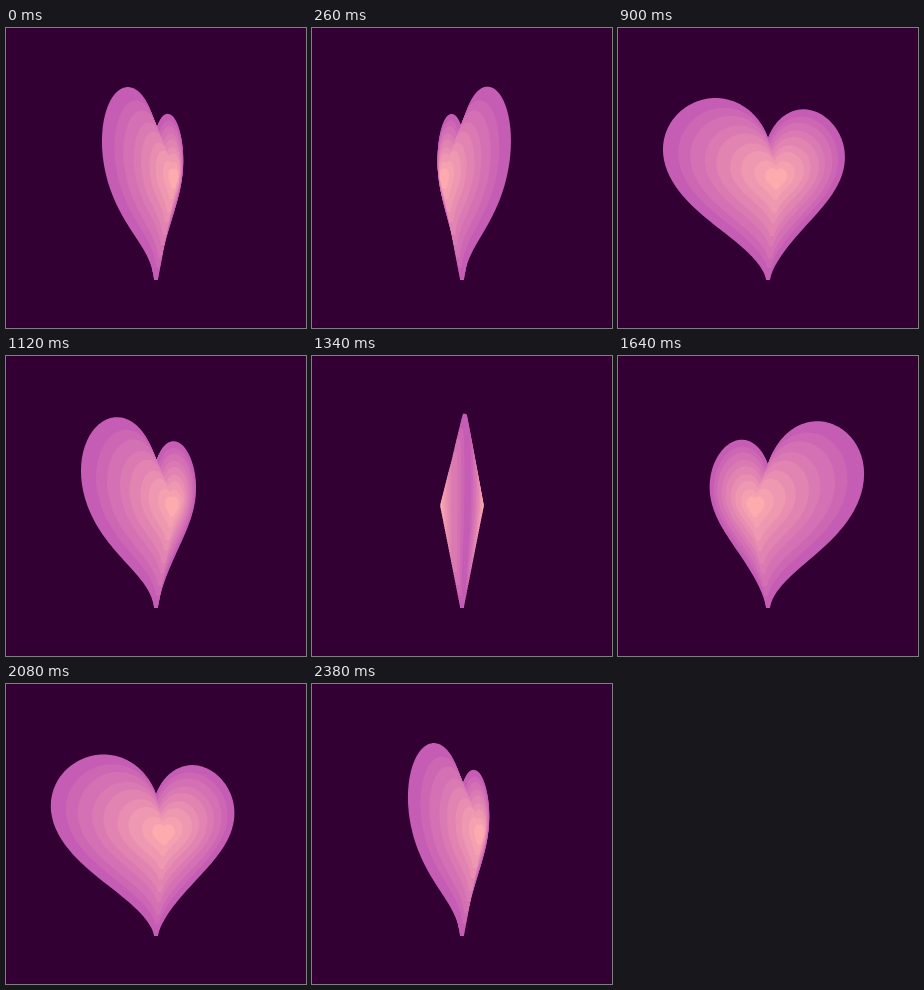
Recreate the animation shown at these times as an HTML page with a canvas. Size 300 by 300 pixels, loop 2400 ms.

```html
<!DOCTYPE html>
<html lang="en">
<head>
<meta charset="utf-8">
<title>Turning heart</title>
<style>
  html, body { margin: 0; width: 100%; height: 100%; overflow: hidden; background: #303; }
  canvas { display: block; width: 300px; height: 300px; }
</style>
</head>
<body>
<canvas id="stage" width="300" height="300"></canvas>
<script>
const ctx = document.getElementById('stage').getContext('2d');
const LOOP = 2400, STEP = 20, START = 69.2 * Math.PI / 180;
const CAMERA = 150 / Math.tan(Math.PI / 6);
const DEPTH = 20, LAYERS = 40, SHADES = 9, POINTS = 160;
const RIM = [198, 93, 181], PEAK = [252, 171, 175];

const outline = Array.from({ length: POINTS }, (_, i) => {
  const a = i / POINTS * 2 * Math.PI;
  return [
    96 * Math.sin(a) ** 3,
    -6 * (13 * Math.cos(a) - 5 * Math.cos(2 * a) - 2 * Math.cos(3 * a) - Math.cos(4 * a))
  ];
});

// Thin slices shrink towards a peak on both sides; their colours form bands.
const layers = [];
for (let i = 1 - LAYERS; i < LAYERS; i++) {
  const k = Math.abs(i) / LAYERS;
  const shade = Math.floor(k * SHADES) / (SHADES - 1);
  layers.push({
    z: i / LAYERS * DEPTH,
    scale: 1 - k,
    color: `rgb(${RIM.map((c, j) => Math.round(c + (PEAK[j] - c) * shade))})`
  });
}

function drawLayer({ z, scale, color }, cos, sin) {
  ctx.beginPath();
  for (const [px, py] of outline) {
    const x = px * scale;
    const zoom = CAMERA / (CAMERA + x * sin - z * cos);
    ctx.lineTo(150 + (x * cos + z * sin) * zoom, 150 + py * scale * zoom);
  }
  ctx.closePath();
  ctx.fillStyle = ctx.strokeStyle = color;
  ctx.fill();
  ctx.stroke();
}

function draw(time) {
  const step = Math.floor(time % LOOP / STEP);
  const angle = START + step / (LOOP / STEP - 1) * 2 * Math.PI;
  const cos = Math.cos(angle), sin = Math.sin(angle);
  ctx.fillStyle = '#303';
  ctx.fillRect(0, 0, 300, 300);
  ctx.lineWidth = 4;
  ctx.lineJoin = 'bevel';
  // Parallel planes: the one farthest from the camera goes first.
  const distance = layer => Math.abs(layer.z - CAMERA * cos);
  [...layers].sort((a, b) => distance(b) - distance(a))
    .forEach(layer => drawLayer(layer, cos, sin));
}

const begin = performance.now();
function tick() {
  draw(performance.now() - begin);
  requestAnimationFrame(tick);
}
tick();
</script>
</body>
</html>
```
